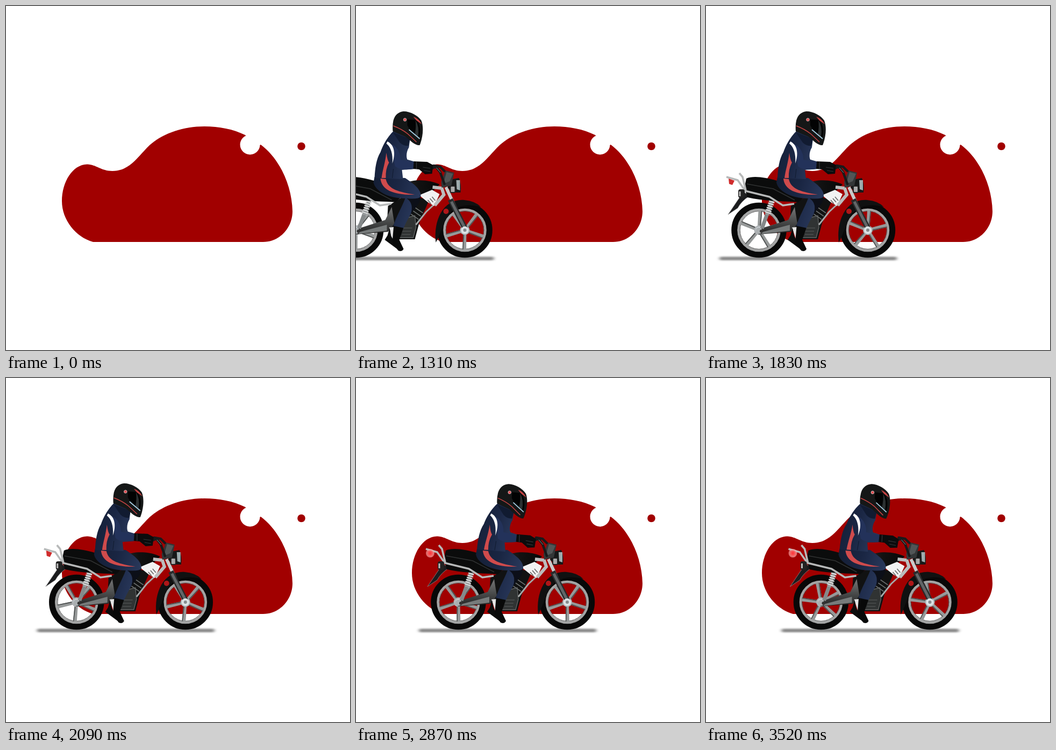
An HTML page for the animation above (3650 ms loop, 640x640 px).

```html
<!DOCTYPE html>
<html lang="en">
<head>
<meta charset="utf-8">
<title>Motorcycle ride</title>
<style>
html, body { margin: 0; width: 100%; height: 100%; overflow: hidden; background: #fff; }
svg { display: block; width: 100vw; height: 100vh; }
</style>
</head>
<body>
<svg viewBox="0 0 640 640">
  <defs>
    <linearGradient id="navy" x1="0" x2="1" y2=".3">
      <stop stop-color="#141e35"/><stop offset=".5" stop-color="#1a2643"/><stop offset="1" stop-color="#29385b"/>
    </linearGradient>
    <linearGradient id="steel" x1="0" x2="0" y2="1">
      <stop stop-color="#777"/><stop offset=".5" stop-color="#4b4d4d"/><stop offset="1" stop-color="#222"/>
    </linearGradient>
    <linearGradient id="gloss" x1="0" x2="1">
      <stop stop-color="#222"/><stop offset=".4" stop-color="#111"/><stop offset="1" stop-color="#080808"/>
    </linearGradient>
    <radialGradient id="brake">
      <stop stop-color="#ff3035"/><stop offset=".5" stop-color="#f65b5b"/><stop offset="1" stop-color="#ffc5c5" stop-opacity=".5"/>
    </radialGradient>
    <filter id="soft" x="-10%" y="-300%" width="120%" height="700%"><feGaussianBlur stdDeviation="3 1.8"/></filter>
    <g id="wheel" fill="none">
      <circle r="45.5" stroke="#080808" stroke-width="11.5"/>
      <circle r="38" stroke="#a3a4a4" stroke-width="4.5"/>
      <circle r="35.3" stroke="#555" stroke-width="1"/>
      <g class="spokes"></g>
      <circle r="9" fill="#aeb2b5"/><circle r="6" fill="#dfe5e8"/><circle r="2.5" fill="#777"/>
    </g>
  </defs>

  <g fill="#a10000">
    <path d="M162 439H478C510 439 533 412 533 382C532 335 510 285 474 258L445 240C422 229 397 224 369 224C325 224 285 240 262 264C240 288 226 307 198 307C177 307 168 295 151 294.5C124 295 104 327 104 363C104 398 130 430 162 439Z"/>
    <circle cx="549.5" cy="261" r="7.3"/>
  </g>
  <path d="M445 240L458 236L477 252L473 259Z" fill="#fff"/>
  <circle cx="454" cy="258" r="18.5" fill="#fff"/>

  <g id="bike">
    <rect x="25" y="466.5" width="330" height="6.5" rx="3" fill="#888" filter="url(#soft)"/>
    <use href="#wheel" x="98.5" y="417"/>
    <use href="#wheel" x="301" y="417"/>

    <!-- engine, swing arm and frame -->
    <path d="M158 372L190 352L235 360L216 404L208 434H172L156 410Z" fill="#111212"/>
    <path d="M178 398L208 390L210 412L205 431H178L168 414Z" fill="#303333" stroke="#626565" stroke-width="1.3"/>
    <path d="M180 413H203M181 419H201M184 425H200" stroke="#5a5e5e" stroke-width="1.2"/>
    <path d="M207 374L223 385M203 380L219 391M199 386L215 397" stroke="#6a6e6e" stroke-width="1.6"/>
    <path d="M243 370L229 383L210 407" fill="none" stroke="#a5a8a8" stroke-width="3"/>
    <path d="M94 417L153 398L165 374L170 405L158 420L98 425Z" fill="url(#steel)"/>
    <path d="M103 421L156 407V418L104 424Z" fill="#777b7b"/>
    <path d="M124 359L104 414" stroke="#85898a" stroke-width="7"/>
    <path d="M124 359L114 388" stroke="#d5d7d7" stroke-width="11" stroke-dasharray="2.5 1.8"/>
    <circle cx="98.5" cy="418" r="6" fill="#aaafb1"/><circle cx="103" cy="419" r="3" fill="#333"/>

    <!-- tail, seat and tank -->
    <path d="M70 345L41 388L59 376Q66 363 80 354Z" fill="#1b1c1e" stroke="#999" stroke-width=".7"/>
    <path d="M75 321C88 315 111 319 132 325L194 338L188 351L172 365C144 363 105 363 77 356Q70 338 75 321Z" fill="#0b0c0c"/>
    <path d="M76 331L125 340L165 361" fill="none" stroke="#303232" stroke-width="1.5"/>
    <path d="M38 318L59 324L73 344L118 355L143 371L164 368M62 311L68 318L74 343" fill="none" stroke="#b7b9b9" stroke-width="3.6" stroke-linejoin="round"/>
    <path d="M42 321L53 325L49 333L43 331Z" fill="#d02c2c"/>
    <circle id="glow" cx="46" cy="326" r="8" fill="url(#brake)"/>
    <rect x="60" y="341" width="12" height="16" rx="4" fill="#222"/><path d="M63 345V354" stroke="#bbb" stroke-width="3"/>
    <path d="M188 330C207 321 236 323 254 332L243 343L217 356L197 348Z" fill="url(#gloss)"/>
    <path d="M216 352L240 342L254 350L244 372L232 365Z" fill="#f2f2f2"/>
    <path d="M232 361L238 368M236 358L242 365M240 355L246 362" stroke="#666" stroke-width="1.6"/>
    <path d="M241 337L258 339L262 351L245 371" fill="none" stroke="#bbbdbd" stroke-width="6"/>

    <!-- front end -->
    <path d="M247 440C242 397 262 358 300 361Q321 363 331 374C306 367 286 372 273 385C263 397 258 417 251 432Z" fill="#101111"/>
    <path d="M266 337L282 372" stroke="#c8caca" stroke-width="6"/>
    <path d="M274 360L302 415" stroke="#292b2c" stroke-width="10"/>
    <path d="M276 364L301 413" stroke="#626668" stroke-width="5"/>
    <circle cx="301" cy="417" r="7" fill="#dce3e6"/><circle cx="301" cy="417" r="3" fill="#858b8e"/>
    <circle cx="266" cy="382" r="5" fill="#ae1719"/>
    <path d="M274 323L290 320Q295 332 293 347L278 347L269 338Z" fill="#161818"/>
    <path d="M285 324H292V343L286 341Z" fill="#9eabad"/>
    <rect x="274" y="335" width="9" height="12" rx="2" fill="#aaa" stroke="#222" stroke-width="2"/>
    <path d="M265 306L281 310L276 334L258 338L257 327Z" fill="#333637"/>
    <path d="M267 309L279 312L273 326L261 331Z" fill="#515556"/>
    <path d="M229 307L247 299L255 309L263 331M243 297L255 299L263 307" fill="none" stroke="#181a1b" stroke-width="4.5" stroke-linecap="round"/>
    <path d="M248 301L256 310" stroke="#888" stroke-width="1"/>

    <!-- leg and boots -->
    <path d="M160 412L170 411L169 439Z" fill="#e4e4e4"/>
    <path d="M161 413L164 428L172 443L179 455L152 435L157 427Z" fill="#0b0c0c"/>
    <path d="M169 405L187 412L179 435L187 452Q184 458 177 455L166 440Z" fill="#080909"/>
    <path d="M133 318L190 320C208 332 220 342 219 354C212 370 198 388 187 413L168 409C174 390 184 374 190 358C158 358 134 344 131 328Z" fill="url(#navy)"/>
    <path d="M144 321C146 343 170 352 208 351C180 346 158 342 154 322Z" fill="#cf4b4c"/>
    <path d="M193 358Q216 360 219 354L216 366L200 388Q207 368 193 358Z" fill="#0c0f18"/>

    <g id="rider">
      <path d="M170 231L199 247L197 263C190 274 193 287 195 286L209 290L208 303L184 305L186 322L133 320C134 302 136 285 144 272C149 257 158 242 170 231Z" fill="url(#navy)"/>
      <path d="M163 257C177 261 182 278 181 286L206 290V303Q181 307 171 298Z" fill="#23325a"/>
      <path d="M167 235L199 247L196 260Q187 261 180 254Z" fill="#111b31"/>
      <path d="M157 252C171 259 172 276 166 293C168 274 162 261 155 256Z" fill="#fff"/>
      <path d="M155 273Q157 288 160 291Q153 304 154 320H146C148 305 153 291 155 273Z" fill="#cf4b4c"/>
      <path d="M168 303L166 320" stroke="#101a2e" stroke-width="1"/>
      <path d="M206 289L231 290L242 296L240 312L227 313L216 304L205 303Z" fill="#0b0c0d"/>
      <path d="M211 290V303M223 300L237 302M225 306L237 308" stroke="#35383a" stroke-width="1.2"/>
      <path d="M168 213C171 202 178 197 187 196C200 196 214 204 220 213C225 225 223 245 217 259C207 260 197 247 190 243L167 233Q166 222 168 213Z" fill="#151717"/>
      <path d="M194 211L210 212Q221 222 217 244Q199 234 194 222Z" fill="#020303"/>
      <path d="M209 212Q211 224 208 239L214 243Q217 225 209 212Z" fill="#2b3031"/>
      <path d="M205 206Q215 209 221 220L211 213Z" fill="#c94444"/>
      <path d="M168 223Q184 229 195 238L211 253" fill="none" stroke="#c94444" stroke-width="1.5"/>
      <path d="M197 230L217 247" stroke="#a9d1e5" stroke-width="1.7"/>
      <circle cx="189.5" cy="211.5" r="2.8" fill="#e14d50" stroke="#d6cfd0" stroke-width=".8"/>
    </g>
  </g>
</svg>
<script>
const LOOP = 3650, STEP = 130, FIRST = 140;
const HOME_X = 301, WHEEL_RADIUS = 51;
const bike = document.getElementById("bike");
const rider = document.getElementById("rider");
const glow = document.getElementById("glow");
const spokes = document.querySelector(".spokes");

// Time in ms and horizontal centre of the front wheel.
const ride = [[530, -88], [660, -45], [920, 58], [1310, 202.5], [1830, 301],
  [2350, 358.5], [2870, 393], [3520, 416.5]];

spokes.innerHTML = [0, 72, 144, 216, 288].map(angle =>
  `<g transform="rotate(${angle})"><path d="M-3-7L-3.5-36H3.5L3-7Z" fill="#969999"/>
   <path d="M1-7L2-36H3.5L3-7Z" fill="#4e5151"/></g>`).join("");

function slope(i) {
  const a = ride[Math.max(0, i - 1)], b = ride[i], c = ride[Math.min(ride.length - 1, i + 1)];
  const before = b[0] - a[0], after = c[0] - b[0];
  if (!before || !after) return (c[1] - a[1]) / (c[0] - a[0]);
  return ((b[1] - a[1]) / before * after + (c[1] - b[1]) / after * before) / (before + after);
}

function wheelX(t) {
  const i = Math.min(ride.length - 2, ride.findIndex(point => t <= point[0]) - 1);
  const [t0, x0] = ride[i], [t1, x1] = ride[i + 1];
  const span = t1 - t0, u = (t - t0) / span, v = 1 - u;
  return v * v * (1 + 2 * u) * x0 + u * u * (3 - 2 * u) * x1
    + span * u * v * (v * slope(i) - u * slope(i + 1));
}

function draw(now) {
  const time = now % LOOP;
  const t = time < FIRST ? 0 : FIRST + STEP * Math.floor((time - FIRST) / STEP);
  const visible = t >= 660;
  bike.style.display = visible ? "" : "none";
  if (visible) {
    const travel = wheelX(t) - HOME_X;
    const roll = 4 + travel / WHEEL_RADIUS * 180 / Math.PI;
    const lean = 2.6 * Math.min(1, Math.max(0, (t - 2350) / 600));
    bike.setAttribute("transform", `translate(${travel})`);
    spokes.setAttribute("transform", `rotate(${roll})`);
    rider.setAttribute("transform", `rotate(${lean} 160 320)`);
    glow.style.display = t >= 2610 ? "" : "none";
  }
  requestAnimationFrame(() => draw(performance.now() - start));
}

const start = performance.now();
draw(0);
</script>
</body>
</html>
```
